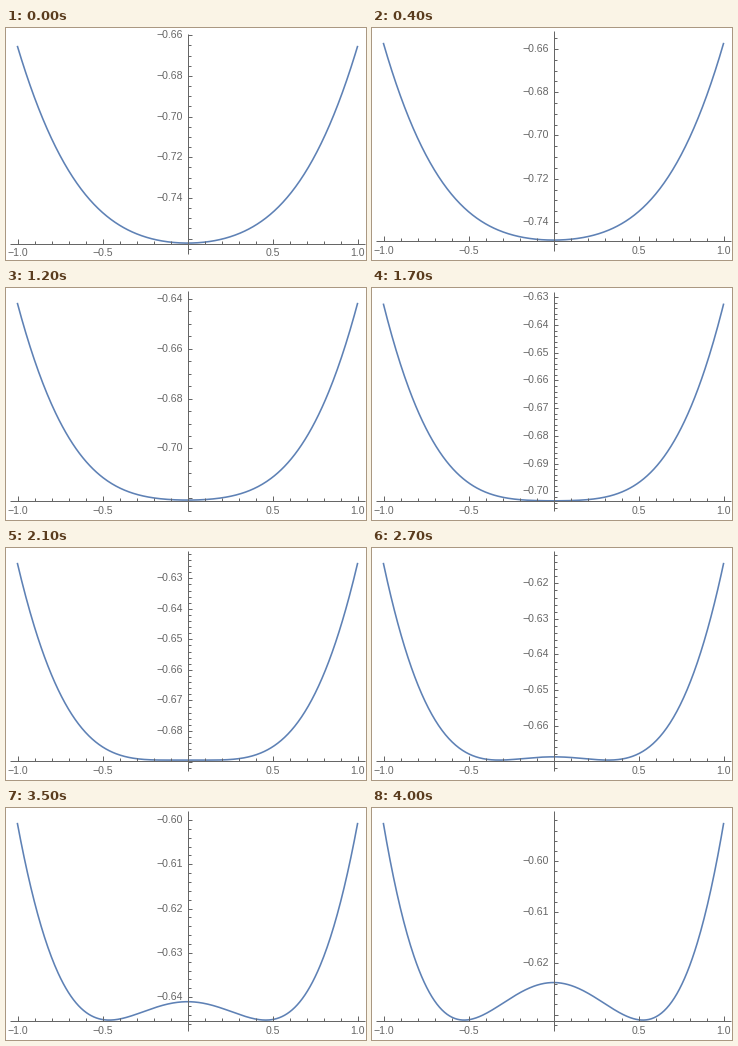
Animation, 360 px wide and 232 px high, one loop 4.1 s. Source, as a matplotlib script:

```python
import numpy as np
import matplotlib.pyplot as plt
from matplotlib.animation import FuncAnimation
from matplotlib.collections import LineCollection

W, H, DPI = 360, 232, 64
FRAMES, INTERVAL = 41, 100
PX = 72 / DPI

X0, X_SCALE = 181.5, 170.2          # pixel of m = 0, pixels per unit of m
HALF_W = X_SCALE / 0.96
PLOT_H = 2 * HALF_W / ((1 + 5 ** 0.5) / 2)
PAD = 0.05 * PLOT_H
BASE_TOP = 3.9
GREY, BLUE = "#666666", "#5e81b5"
MAJOR, MINOR = 4.5, 3

m = np.linspace(-1, 1, 401)


def free_energy(temp):
    return m ** 2 / 2 - temp * np.log(2 * np.cosh(m / temp))


def snap(v):
    return np.floor(v) + 0.5


def number(value, digits):
    return f"{value:.{digits}f}".replace("-", "\u2212")


fig = plt.figure(figsize=(W / DPI, H / DPI), dpi=DPI, facecolor="white")
ax = fig.add_axes([0, 0, 1, 1])
ax.set_xlim(0, W)
ax.set_ylim(H, 0)
ax.axis("off")

curve, = ax.plot([], [], color=BLUE, lw=1.6 * PX, solid_capstyle="butt", zorder=1)
rules = LineCollection([], colors=GREY, linewidths=PX, zorder=2)
ax.add_collection(rules, autolim=False)

font = dict(family="Liberation Sans", size=10.5 * PX, color=GREY, va="baseline")
x_values = (-1.0, -0.5, 0.5, 1.0)
x_labels = [ax.text(X0 + v * X_SCALE, 0, number(v, 1), ha="center", **font)
            for v in x_values]
y_labels = [ax.text(177, 0, "", ha="right", **font) for _ in range(12)]


def y_ticks(low, high, scale):
    """Return (value, is_major) pairs inside the padded range."""
    minor, ratio = (0.005, 4) if high - low > 0.085 else (0.002, 5)
    slack = 0.3 / scale
    first = int(np.ceil((low - slack) / minor))
    last = int(np.floor((high + slack) / minor))
    return [(i * minor, i % ratio == 0) for i in range(first, last + 1)]


def draw(frame):
    f = free_energy(1.1 - 0.005 * frame)
    low, high = f.min(), f.max()
    scale = 0.9 * PLOT_H / (high - low)
    pad = PAD / scale
    ticks = y_ticks(low - pad, high + pad, scale)

    # A label close to the upper edge pushes the whole plot down.
    top_label = max(v for v, major in ticks if major)
    gap = max(0, (high + pad - top_label) * scale)
    top = BASE_TOP + max(0, 3 - 0.55 * gap)
    base = top + PAD + (high - low) * scale

    curve.set_data(X0 + m * X_SCALE, base - (f - low) * scale)

    axis_y = snap(base)
    lines = [[(X0 - HALF_W, axis_y), (X0 + HALF_W, axis_y)],
             [(X0, np.floor(top)), (X0, np.floor(top + PLOT_H))]]
    for i in range(-10, 11):
        x = snap(X0 + i * X_SCALE / 10)
        size = MINOR if i % 5 else MAJOR
        lines.append([(x, axis_y), (x, axis_y - size)])

    shown = []
    for value, major in ticks:
        y = base - (value - low) * scale
        size = MAJOR if major else MINOR
        lines.append([(X0, snap(y)), (X0 + size, snap(y))])
        if major and abs(y - base) > 7:
            shown.append((value, snap(y)))
    rules.set_segments(lines)

    for label in x_labels:
        label.set_y(axis_y + 13)
    for label in y_labels:
        label.set_text("")
    for label, (value, y) in zip(y_labels, shown):
        label.set_text(number(value, 2))
        label.set_y(y + 3.5)
    return [curve, rules, *x_labels, *y_labels]


anim = FuncAnimation(fig, draw, frames=FRAMES, interval=INTERVAL,
                     repeat=True, repeat_delay=0, blit=False)
plt.show()
```
